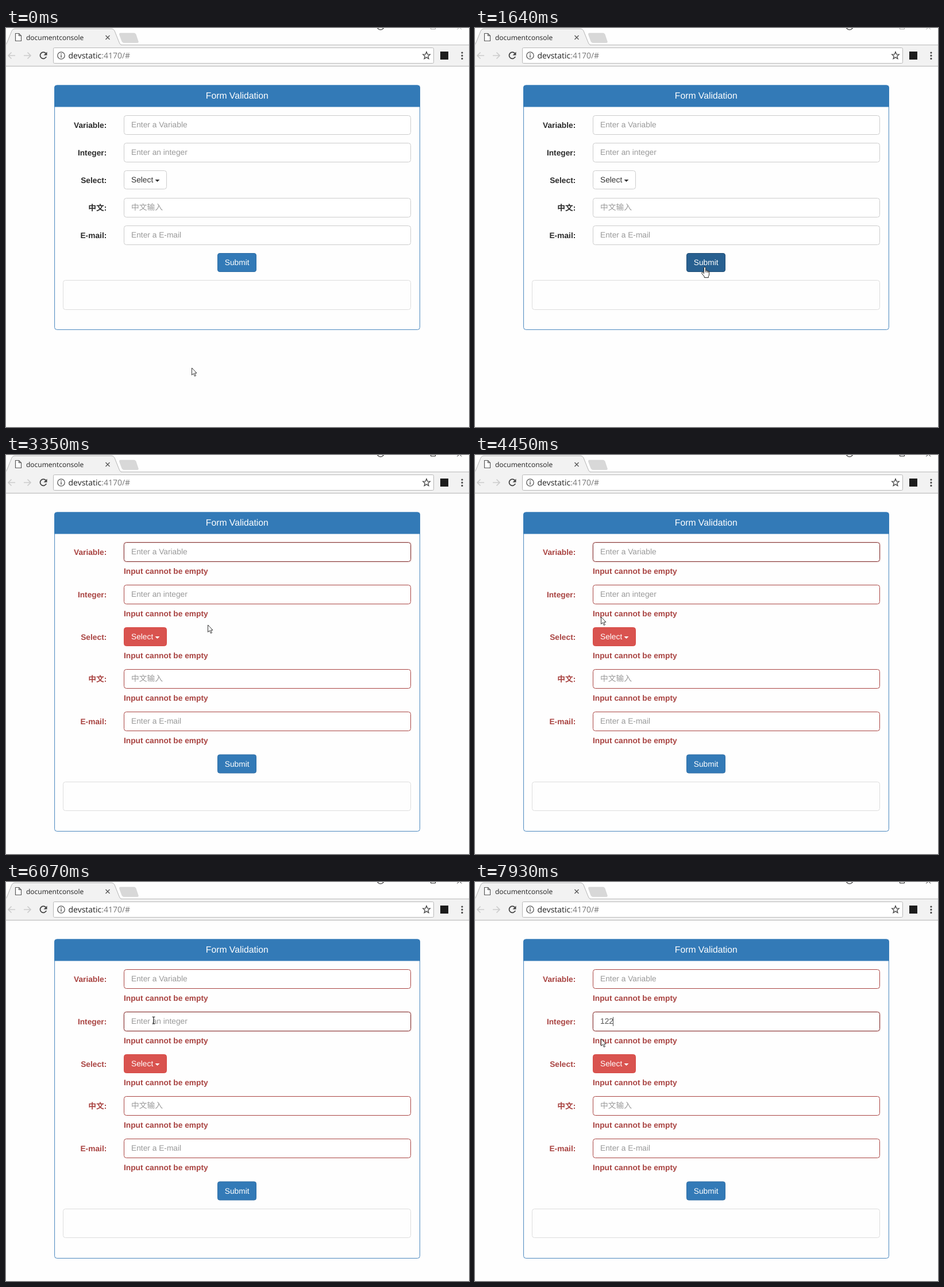
An HTML page for the animation above (7.99 s loop, 806 px wide and 695 px high).

```html
<!DOCTYPE html>
<html lang="en">
<head>
<meta charset="utf-8">
<title>Form Validation</title>
<style>
  html, body { margin: 0; width: 100%; height: 100%; overflow: hidden; background: #fefefe; }
  svg { display: block; width: 806px; height: 695px; }
  text { font: 13.75px "Liberation Sans", "Noto Sans CJK SC", "Noto Sans CJK", sans-serif;
         text-rendering: geometricPrecision; white-space: pre; }
  .bold { font-weight: 700; text-anchor: end; }
  .help { font-weight: 700; fill: #a94442; }
  .ui { font-family: "Open Sans", "Noto Sans", sans-serif; }
  .mid { text-anchor: middle; fill: #fff; }
</style>
</head>
<body>
<svg id="stage" viewBox="0 0 806 695" fill="none">
  <rect width="806" height="695" fill="#fefefe"/>

  <!-- browser frame -->
  <rect y="29" width="806" height="37" fill="#f2f2f2"/>
  <path d="M200 29.5H806" stroke="#b8b8b8"/>
  <path d="M-1 29.5Q1 28 2 25L10 5Q11.5 1.5 15 1.5H184Q187.5 1.5 189 5L197 25Q198.5 29.5 201 29.5" fill="#f2f2f2" stroke="#b5b5b5"/>
  <path d="M199 9H223Q225 9 226 11L230 23Q231 25.5 229 25.5H205Q203 25.5 202 23.5L197.5 11.5Q197 9 199 9Z" fill="#d8d8d8" stroke="#cfcfcf" stroke-width=".6"/>
  <path d="M16.5 9.5H22.5L26.5 13.5V22.5H16.5ZM22.5 9.5V13.5H26.5" fill="#fff" stroke="#5a5a5a" stroke-width="1.2"/>
  <text class="ui" x="35" y="20.5" style="font-size:12px" fill="#222">documentconsole</text>
  <path d="M173.5 13L180.5 20M180.5 13L173.5 20" stroke="#555" stroke-width="1.3"/>
  <circle cx="652" cy="-3" r="6" stroke="#555" stroke-width="1.5"/>
  <path id="controls" d="M739.5 -6V2H747.5V-6M785.5 2.5L793 -5M793 2.5L785.5 -5"/>

  <path d="M16 48H4M9.5 42.5L4 48L9.5 53.5M31 48H43M37.5 42.5L43 48L37.5 53.5" stroke="#ccc" stroke-width="1.6"/>
  <path d="M69.3 44A5.6 5.6 0 1 0 70.2 50" stroke="#444" stroke-width="1.8"/>
  <path d="M71.5 41.5V47.5H65.5Z" fill="#444"/>
  <rect x="82.500" y="34.5" width="662" height="27" rx="2" fill="#fff" stroke="#b8b8b8"/>
  <circle cx="96" cy="48" r="6.2" stroke="#555" stroke-width="1.3"/>
  <path d="M96 47V51.5M96 44.3V45.9" stroke="#555" stroke-width="1.5"/>
  <text class="ui" x="108.5" y="53" style="font-size:14px" fill="#222">devstatic<tspan fill="#777">:4170/#</tspan></text>
  <path id="star" stroke="#444" stroke-width="1.3"/>
  <rect x="756" y="41" width="14" height="14" fill="#1c1c1c"/>
  <path d="M794 43h.01M794 48.2h.01M794 53.4h.01" stroke="#444" stroke-width="3.2" stroke-linecap="round"/>
  <path d="M0 66.500H806" stroke="#b4b4b4"/>

  <!-- form panel -->
  <rect id="panel" x="84.6" y="99.8" width="635.8" rx="4" stroke="#4786be"/>
  <path d="M84.2 137.5V104Q84.2 99.7 88.5 99.7H716.5Q720.8 99.7 720.8 104V137.5Z" fill="#337ab7"/>
  <text class="mid" x="402.3" y="123.3" style="font-size:15.72px">Form Validation</text>
  <g id="rows"></g>
  <g id="submit">
    <rect x="368.5" y=".5" width="67" height="32" rx="3.5"/>
    <text class="mid" x="402.2" y="21.3">Submit</text>
  </g>
  <rect id="result" x="99.5" width="605" rx="4" stroke="#ddd"/>
  <rect id="caret" width="1" height="16" fill="#555"/>

  <g id="pointer" stroke-linejoin="round" stroke="#222">
    <path d="M.5 0V12.5L3.4 9.8L5.4 14.5L7.4 13.7L5.4 9.1H9Z" fill="#fff" stroke-width=".9"/>
    <path d="M-1.5 9.5V1.8A1.4 1.4 0 0 1 1.4 1.8V6.5Q3 5.5 3.8 7Q5.3 6.2 6 7.6Q7.6 7.3 7.6 9.2V13Q7.6 15.3 6.4 16.5V18.7H-.8V17L-5 11.6Q-6 9.7 -4.4 9.3Q-3.2 9.1 -1.5 11.5ZM1.4 6.5V9.5M3.9 7V10M6 7.6V10" fill="#fff"/>
    <path d="M-2.5 -6H-.8L0 -5.3L.8 -6H2.5M0 -5.3V5.3M-2.5 6H-.8L0 5.3L.8 6H2.5" stroke-width="1.2"/>
  </g>
</svg>

<script>
const LOOP = 7990;
const PRESS = 2450, REJECT = 2560, REFOCUS = 5580;
const $ = id => document.getElementById(id);
const set = (el, attrs) => { for (const k in attrs) el.setAttribute(k, attrs[k]); };
const show = (el, on) => set(el, { visibility: on ? 'visible' : 'hidden' });
const add = (parent, tag, attrs, text = '') => {
  const el = document.createElementNS('http://www.w3.org/2000/svg', tag);
  set(el, attrs);
  el.textContent = text;
  return parent.appendChild(el);
};
const mix = (a, b, p) => `rgb(${a.map((v, i) => Math.round(v + (b[i] - v) * p))})`;

const GREY = [204, 204, 204], RED = [169, 68, 66], DARK_RED = [132, 53, 52];

// five rows, submit button, result box, panel bottom
const COMPACT = [152, 200, 248, 296, 344, 392, 439, 525];
const EXPANDED = [152, 226, 300, 373, 447, 521.5, 569, 655];

const FIELDS = [
  ['Variable:', 'Enter a Variable'],
  ['Integer:', 'Enter an integer'],
  ['Select:', null],
  ['中文:', '中文输入'],
  ['E-mail:', 'Enter a E-mail']
];

const rows = FIELDS.map(([name, hint]) => {
  const g = add($('rows'), 'g', {});
  const height = hint ? 33 : 32;
  const label = add(g, 'text', { class: 'bold', x: 175.3, y: 21.6 }, name);
  const box = add(g, 'rect', { x: 205.5, y: .5, width: hint ? 499 : 74, height, rx: 4 });
  const text = add(g, 'text', { x: 218, y: 21.4 }, hint || 'Select');
  const arrow = hint ? null : add(g, 'path', { d: 'M259.5 16H267.5L263.5 20Z' });
  const help = add(g, 'text', { class: 'help', x: 205, y: height + 21.7 }, 'Input cannot be empty');
  return { g, hint, label, box, text, arrow, help };
});

const starPoints = Array.from({ length: 10 }, (_, i) => {
  const r = i % 2 ? 2.9 : 6.6, a = i * Math.PI / 5;
  return `${732 + r * Math.sin(a)} ${48.2 - r * Math.cos(a)}`;
});
set($('star'), { d: `M${starPoints.join('L')}Z` });

// start, end, steps, x, y
const MOVES = [
  [810, 1580, 14, 400, 416],
  [3110, 3350, 5, 351, 296],
  [3400, 3870, 9, 343, 290],
  [3930, 4250, 6, 175, 268],
  [4300, 4450, 3, 219, 282],
  [4500, 4680, 4, 230, 287],
  [4740, 5000, 5, 384, 252],
  [5060, 5390, 6, 257, 241],
  [6510, 6570, 2, 248, 267],
  [7870, 7930, 2, 219, 273]
];

function pointerAt(t) {
  let x = 323, y = 592;
  for (const [start, end, steps, toX, toY] of MOVES) {
    if (t < start) break;
    const k = Math.floor((t - start) / (end - start) * (steps - 1) + 1e-6) + 1;
    const p = Math.min(1, k / steps), e = p * p * (3 - 2 * p);
    x += (toX - x) * e;
    y += (toY - y) * e;
  }
  return [x, y];
}

const fade = (t, half, full) => t < half ? 0 : t < full ? .5 : 1;

function drawRows(t, tops, typed) {
  const failed = t >= REJECT;
  const red = fade(t, 2610, 2660), moved = fade(t, REFOCUS, 5640);
  rows.forEach((row, i) => {
    set(row.g, { transform: `translate(0 ${tops[i]})` });
    set(row.label, { fill: failed ? '#a94442' : '#2b2b2b' });
    show(row.help, failed);
    if (row.arrow) {
      const ink = failed ? '#fff' : '#333';
      set(row.box, { fill: failed ? '#d9534f' : '#fff', stroke: failed ? '#d64944' : '#ccc' });
      set(row.text, { fill: ink });
      set(row.arrow, { fill: ink });
      return;
    }
    const focus = i === 0 ? red * (1 - moved) : i === 1 ? moved : 0;
    const target = RED.map((v, c) => v + (DARK_RED[c] - v) * focus);
    set(row.box, { fill: '#fff', stroke: mix(GREY, target, red) });
    row.box.style.filter = focus ? `drop-shadow(0 0 1.5px rgba(206,132,131,${focus * .7}))` : 'none';
    const value = i === 1 ? typed : '';
    row.text.textContent = value || row.hint;
    set(row.text, { fill: value ? '#555' : '#999' });
  });
}

function drawCaret(t, tops, typed) {
  const second = t >= REFOCUS;
  const phase = Math.floor((t - (second ? 5570 : 2610)) / 500);
  const on = second ? phase !== 1 : t >= REJECT && (phase < 0 || phase % 2 === 0);
  show($('caret'), on);
  set($('caret'), { x: Math.floor(218 + typed.length * 7.65), y: tops[second ? 1 : 0] + 9 });
}

function drawPointer(t, tops) {
  const [x, y] = pointerAt(t);
  const overInput = x > 205 && x < 705 &&
    rows.some((row, i) => row.hint && y >= tops[i] && y <= tops[i] + 34);
  const shape = t >= 1640 && t < 3110 ? 1 : overInput ? 2 : 0;
  set($('pointer'), { transform: `translate(${Math.round(x)} ${Math.round(y)})` });
  [...$('pointer').children].forEach((el, i) => show(el, i === shape));
}

function draw(t) {
  const tops = t >= REJECT ? EXPANDED : COMPACT;
  const typed = '122'.slice(0, [6630, 7130, 7560].filter(at => t >= at).length);
  drawRows(t, tops, typed);

  const pressed = t >= PRESS && t < REJECT;
  const hover = t >= 1580 && t < 2660;
  const [fill, stroke] = pressed ? ['#204d74', '#122b40']
    : hover ? ['#286090', '#204d74'] : ['#337ab7', '#2e6da4'];
  set($('submit'), { transform: `translate(0 ${tops[5]})` });
  set($('submit').firstElementChild, { fill, stroke });
  set($('result'), { y: tops[6] + .5, height: t >= REJECT ? 50 : 51 });
  set($('panel'), { height: tops[7] - 99.4 });
  set($('controls'), { stroke: t >= PRESS ? '#222' : '#aaa' });

  drawCaret(t, tops, typed);
  drawPointer(t, tops);
}

const began = performance.now();
function tick() {
  draw((performance.now() - began) % LOOP);
  requestAnimationFrame(tick);
}
tick();
</script>
</body>
</html>
```
